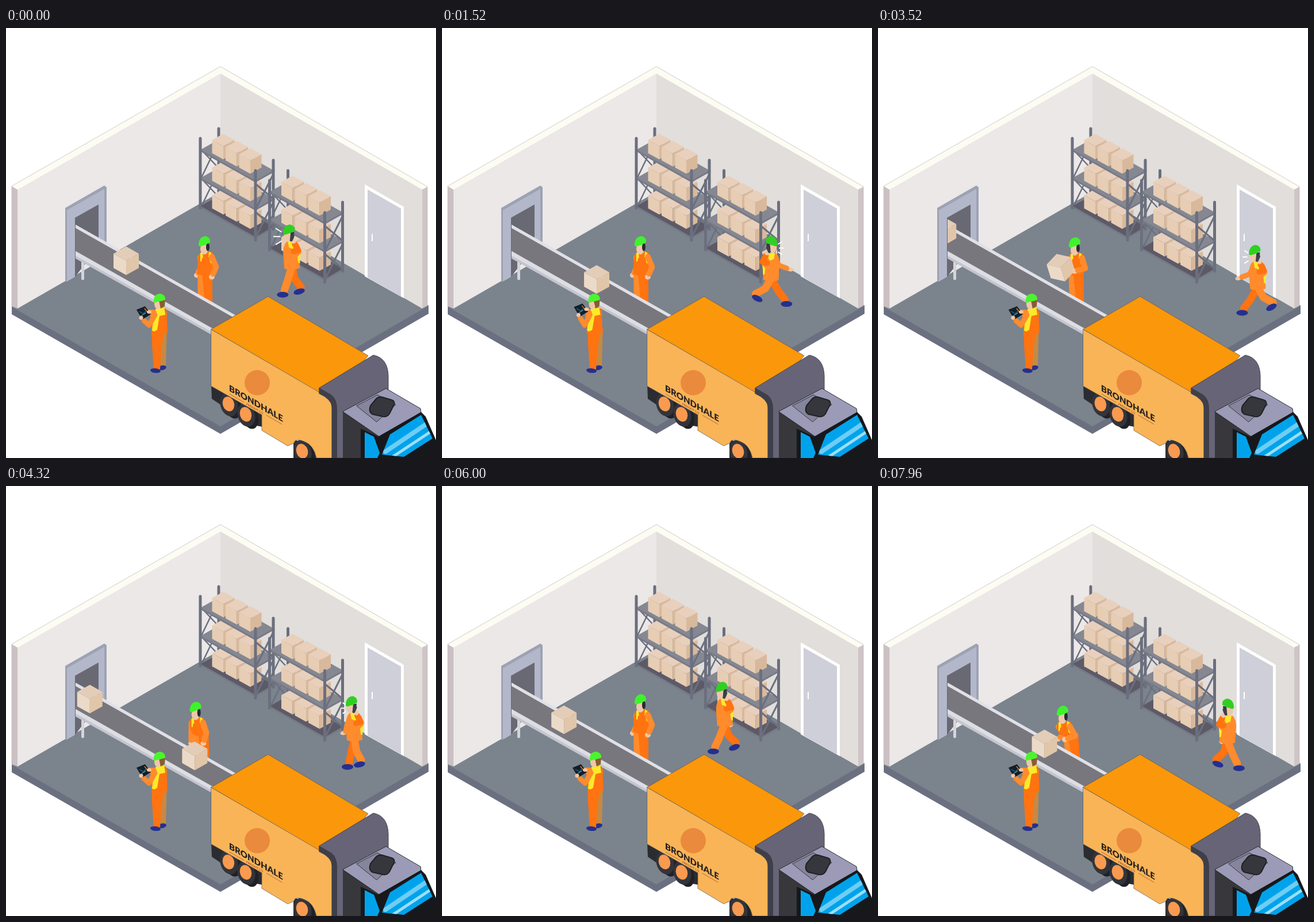
Write an HTML page with a canvas that moves like this. It is 748 px wide and 748 px high and loops after 8 s.

```html
<!DOCTYPE html>
<html lang="en">
<head>
<meta charset="utf-8">
<title>Warehouse</title>
<style>
html, body { margin: 0; width: 100%; height: 100%; overflow: hidden; background: #fff; }
canvas { display: block; width: 748px; height: 748px; }
</style>
</head>
<body>
<canvas id="stage" width="748" height="748"></canvas>
<script>
const ctx = document.getElementById('stage').getContext('2d');
const LOOP = 8000, CYCLE = 5920;
const ORANGE = '#ff7310', LIGHT = '#ff8b2c', SKIN = '#efc7a8', SHOE = '#24308f', YELLOW = '#fbe92b';
const STEEL = '#6b6f7e', SHELF = '#858791';

// ---- drawing helpers ----
function shape(color, d, edge, width = 1) {
  const path = new Path2D(d);
  ctx.fillStyle = color;
  ctx.fill(path);
  if (edge) { ctx.strokeStyle = edge; ctx.lineWidth = width; ctx.stroke(path); }
}
function line(color, width, ...points) {
  ctx.beginPath();
  for (let i = 0; i < points.length; i += 2) ctx.lineTo(points[i], points[i + 1]);
  ctx.strokeStyle = color;
  ctx.lineWidth = width;
  ctx.lineJoin = ctx.lineCap = 'round';
  ctx.stroke();
}
function oval(color, x, y, rx, ry = rx, turn = 0) {
  ctx.beginPath();
  ctx.ellipse(x, y, rx, ry, turn, 0, 7);
  ctx.fillStyle = color;
  ctx.fill();
}
function at(x, y, draw) {
  ctx.save();
  ctx.translate(x, y);
  draw();
  ctx.restore();
}
const mix = (a, b, k) => a + (b - a) * k;
const smooth = (a, b, t) => {
  const k = Math.min(1, Math.max(0, (t - a) / (b - a)));
  return k * k * (3 - 2 * k);
};
// Eased values between rows of [time, ...values].
function pose(keys, t) {
  const i = Math.max(1, keys.findIndex(k => k[0] >= t));
  const from = keys[i - 1], to = keys[i], k = smooth(from[0], to[0], t);
  return from.slice(1).map((v, n) => mix(v, to[n + 1], k));
}

// ---- room ----
function room() {
  shape('#6b7081', 'M10 484L373 692 735 482V497L373 706 10 498Z');
  shape('#7b838d', 'M10 485L373 284 735 483 373 693Z');
  shape('#ebe8e7', 'M20 281L373 79V285L20 488Z');
  shape('#e1dedb', 'M373 79L724 280V488L373 285Z');
  shape('#cbc0c3', 'M10 275L20 281V488L10 484Z');
  shape('#cfc5c7', 'M733 276L724 280V488L733 483Z');
  shape('#fdfcf3', 'M10 275L373 67 733 276 724 281 373 79 20 281Z');
  line('#b9b5b5', .7, 10, 485, 10, 275, 373, 67, 733, 276, 733, 483);

  shape('#fff', 'M624 272L692 311V470L624 432Z');
  shape('#cecfd8', 'M629 281L687 314V467L629 434Z');
  line('#fff', 2, 637, 359, 637, 370);

  shape('#9da2b3', 'M103 313L171 274 175 277V372L161 380V307L120 330V432L103 442Z');
  shape('#b2b7ca', 'M106 317L171 280V374L161 380V307L120 330V433L106 441Z');
  shape('#686973', 'M120 330L161 307V380L120 433Z');
}

function crate(x, y, w, h, depth, top, left, right) {
  at(x, y, () => {
    shape(top, `M0 0L${w} ${h} 0 ${2 * h} ${-w} ${h}Z`);
    shape(left, `M${-w} ${h}L0 ${2 * h}V${2 * h + depth}L${-w} ${h + depth}Z`);
    shape(right, `M${w} ${h}L0 ${2 * h}V${2 * h + depth}L${w} ${h + depth}Z`);
  });
}

function rack(x, y) {
  at(x, y, () => {
    line(STEEL, 5, 32, -15, 32, 103);
    for (const top of [22, 72]) {
      line(STEEL, 2.5, 2, top, 32, top + 32);
      line(STEEL, 2.5, 2, top + 48, 32, top - 14);
    }
    for (const level of [2, 1, 0]) {
      at(0, 49 * level, () => {
        shape(level === 2 ? '#5d5a68' : SHELF, 'M0 22L32 4 128 58 96 77Z');
        line('#777a86', 3, 0, 23, 96, 77, 128, 59);
        for (let i = 0; i < 3; i++) {
          crate(40 + 23.5 * i, -6 + 12.5 * i - level, 19.5, 10.8, 23, '#e8d0bd', '#e6cdb4', '#d9b99c');
        }
      });
    }
    for (const top of [82, 131]) {
      line(STEEL, 3, 97, top, 127, top + 25);
      line(STEEL, 3, 97, top + 42, 127, top - 18);
    }
    line(STEEL, 5, 0, 2, 0, 123);
    line(STEEL, 5, 96, 58, 96, 179);
    line(STEEL, 5, 127, 40, 127, 160);
  });
}

function conveyor() {
  line('#d3d4dc', 5, 133.5, 400, 133.5, 436);
  shape('#77777d', 'M121 346L400 504 400 545 121 392Z');
  shape('#c4c5ce', 'M121 394L360 528V535L121 401Z');
  shape('#dddde4', 'M121 388L360 523V530L121 396Z');
  shape('#e0e0e6', 'M121 342L400 500V506L121 348Z');
}

// ---- parcels ----
const beltY = x => 405 + .542 * (x - 209);
const SPEED = .0395;
function parcelAt(t) {
  if (t > 2080 && t < 4160) {
    return pose([[2080, 291, 449, 0], [2520, 301, 379, 0], [3440, 318, 417, -.3],
      [3600, 318, 417, -.3], [4160, 322, 466, 0]], t);
  }
  const x = t < 3000 ? 209 + SPEED * t : 322 + SPEED * (t - 4160);
  return [x, beltY(x), 0];
}
function parcel(t) {
  if (t < -2700 || t > 5880) return;
  const [x, y, turn] = parcelAt(t);
  const blur = Math.max(0, 1.5 - Math.abs(t - 2520) / 130);
  ctx.save();
  ctx.beginPath();
  ctx.rect(121, 0, 627, 748);
  ctx.clip();
  ctx.globalAlpha = 1 - smooth(5560, 5880, t);
  ctx.translate(x, y);
  ctx.rotate(turn);
  if (blur) ctx.filter = `blur(${blur}px)`;
  crate(0, -25, 22, 12.4, 25, '#e4cdb8', '#ebdac7', '#e1c6aa');
  ctx.restore();
}

// ---- people ----
function helmet(x, y, color) {
  shape(color, `M${x - 10} ${y + 5}Q${x - 9} ${y - 8} ${x + 2} ${y - 9}Q${x + 11} ${y - 7} ${x + 10} ${y + 2}
    Q${x + 2} ${y + 7} ${x - 7} ${y + 9}Q${x - 11} ${y + 8} ${x - 10} ${y + 5}Z`);
}
// The elbow bends out as the hand comes closer than the arm's reach.
function arm(x, y, hx, hy, reach, color, side = 1) {
  const dx = hx - x, dy = hy - y, d = Math.hypot(dx, dy);
  const bend = side * Math.sqrt(Math.max(0, reach * reach - d * d)) / 2 / d;
  const ex = x + dx / 2 + dy * bend, ey = y + dy / 2 - dx * bend;
  oval(SKIN, hx, hy, 5, 4.5);
  line(color, 10, x, y, ex, ey, mix(ex, hx, .68), mix(ey, hy, .68));
}

const LOADER = [
  // time, head, left hand, right hand
  [0, 345, 371, 332, 430, 358, 433], [1560, 345, 371, 332, 430, 358, 433],
  [2040, 321, 391, 313, 440, 325, 441], [2520, 343, 372, 312, 402, 324, 399],
  [3440, 342, 373, 333, 423, 342, 423], [3600, 342, 373, 333, 423, 342, 423],
  [4160, 323, 390, 318, 455, 337, 454], [4600, 345, 371, 332, 430, 358, 433],
  [CYCLE, 345, 371, 332, 430, 358, 433]
];
function loaderBody([x, y, lx, ly]) {
  const hx = 346 + (x - 345) * .45, hy = 428 + (y - 371) * .35;
  const foot = 347 + (x - 345) * .3;
  arm(x - 7, y + 28, lx, ly, 33, LIGHT);
  shape(LIGHT, `M${hx - 13} ${hy - 4}L${hx + 2} ${hy}L${foot} 480H${foot - 13}Z`);
  shape(ORANGE, `M${hx - 5} ${hy - 2}L${hx + 13} ${hy - 6}L${foot + 12} 482H${foot - 1}Z`);
  shape(ORANGE, `M${x - 9} ${y + 21}Q${x} ${y + 17} ${x + 14} ${y + 19}Q${x + 18} ${y + 30} ${hx + 13} ${hy}
    Q${hx} ${hy + 5} ${hx - 13} ${hy}Q${x - 13} ${y + 38} ${x - 9} ${y + 21}Z`);
  shape(YELLOW, `M${x - 7} ${y + 20}L${x - 3} ${y + 19}L${x - 2} ${y + 32}H${x + 7}L${x + 8} ${y + 18}
    L${x + 12} ${y + 20}L${x + 14} ${y + 40}L${x + 10} ${y + 37}L${x - 7} ${y + 35}Z`);
  shape(ORANGE, `M${x - 4} ${y + 29}L${x + 9} ${y + 28}L${x + 11} ${y + 42}H${x - 6}Z`);
  oval(SKIN, x, y + 13, 7, 10);
  oval('#282a35', x + 6, y + 10, 3, 7);
  helmet(x, y, '#3ef32c');
}
const loaderArm = ([x, y, , , rx, ry]) => arm(x + 13, y + 27, rx, ry, 38, LIGHT);

function checker(t) {
  const up = smooth(420, 940, t) - smooth(1420, 1780, t);
  at(0, 0, () => {
    shape('#c48a45', 'M267 524L280 521 278 588 269 589Z');
    oval(SHOE, 272, 591, 7, 4, -.2);
    shape(ORANGE, 'M253 520L276 520 270 560 268 594H257L254 550Z');
    oval(SHOE, 260, 596, 9, 4, .1);
    ctx.translate(-2 * up, 0);
    shape(ORANGE, 'M257 493Q265 486 279 490L281 530Q267 539 253 530L255 510Z');
    shape(YELLOW, 'M260 489Q270 484 278 488L280 498 267 501 263 525Q257 530 254 526L256 508Z');
    line(ORANGE, 3, 277, 489, 279, 500);
    oval(SKIN, 264 - up, 480, 6, 9);
    shape('#8b5b35', `M${266 - up} 474L${277 - up} 473 ${276 - up} 484 269 488Z`);
    shape('#4af52f', `M${257 - up} 474Q${257 - up} 463 ${268 - up} 462Q${278 - up} 464 ${277 - up} 473
      L${266 - up} 476 ${257 - up} 478Z`);
    arm(256, 502, 250 + 2 * up, 495 - 5 * up, 14, LIGHT, -1);
    line(LIGHT, 9, 259, 499, 249 + up, 517, 240 + 3 * up, 509 - 5 * up);
  });
  at(3 * up, -6 * up, () => {
    shape('#101f2b', 'M227 490L242 484 252 498 237 507Z');
    line('#2b708a', 1.2, 232, 493, 239, 497, 243, 493);
    line('#79bfd0', 1, 236, 500, 243, 496);
    line('#e98b3a', 1.2, 241, 488, 246, 494);
    oval(SKIN, 235, 504, 3.5);
    oval(SKIN, 249, 494, 4, 3);
  });
}

function walkingLeg(offset, color) {
  const behind = Math.max(0, -offset);
  const fx = offset, fy = 63 + Math.sqrt(53 * 53 - offset * offset) - behind * .3;
  line(color, 13, 0, 64, fx / 2 + 1 + behind * .1, (64 + fy) / 2, fx, fy - 9);
  oval(SHOE, fx + 3, fy - 1, 10, 5, behind * .018);
}
function soundWaves(beat) {
  if (beat < .06) return;
  const inner = 11 + 5 * beat, outer = 12.5 + 15 * beat;
  for (const a of [-.55, 0, .55]) {
    const c = Math.cos(a), s = Math.sin(a);
    line('#fff', 2, inner * c, 12 + inner * s, outer * c, 12 + outer * s);
  }
}
function walker(t) {
  const turnLeft = 3115, turnRight = 160;
  const time = t < turnRight ? t + CYCLE : t;
  const right = time < turnLeft;
  const p = time - (right ? turnRight : turnLeft);
  const x = right ? 480 + .0686 * p : 683 - .068 * p;
  const y = 371 + .218 * (x - 574) - (right ? 0 : 2.5);
  const stride = Math.cos((p - (right ? 1360 : 405)) * Math.PI / 500);
  const half = 22 * stride + 5;
  at(x, y, () => {
    if (!right) ctx.scale(-1, 1);
    at(right ? -1 : -5, 0, () => {
      const hx = 10 + 21 * stride, hy = 58 - 9 * stride;
      oval(SKIN, hx + 2, hy, 6, 3.5, .2);
      line(LIGHT, 9, 7, 29, 12 + 2 * stride, 42, mix(7, hx, .85), mix(29, hy, .9));
      walkingLeg(half - 3, ORANGE);
      walkingLeg(-half, LIGHT);
      shape(LIGHT, 'M-12 25Q-2 18 9 21Q15 27 15 40L13 68Q0 72-14 67L-13 48-17 38Z');
      shape(YELLOW, 'M-9 22L7 20 5 31-2 34Z');
      shape(YELLOW, 'M-15 42L-10 47-11 57-14 59Z');
    });
    oval(SKIN, 1, 11, 8, 10);
    shape('#353943', 'M-9 4L-3 5-2 15-5 21-8 16Z');
    line(ORANGE, 10, -8, 38, -16, 36, -10, 25);
    oval(SKIN, -8, 20, 4.5);
    line('#3c414a', 5, -7, 11, -4, 18);
    soundWaves(time % 1000 / 1000);
    ctx.scale(-1, 1);
    helmet(0, 0, '#2fd021');
  });
}

// ---- truck ----
function wheel(x, y) {
  oval('#202126', x + 6, y + 2, 14, 23, -.3);
  oval('#33343a', x, y, 15, 21, -.3);
  oval('#f99a50', x - 1, y - 1, 10, 13, -.3);
}
function cab() {
  shape('#37373c', 'M586 667L650 706V748H586Z');
  shape('#9b9bb7', 'M586 667L661 627 721 662 722 669 650 711Z', '#2b2b30');
  shape('#85859e', 'M610 657L646 638 678 655 645 685Z', '#303036');
  shape('#36373d', `M634 657L644 645Q648 641 654 642L671 647Q677 649 675 655L667 671Q663 677 656 676L638 672
    Q630 668 634 657Z`, '#202126', 2);
  shape('#17181b', 'M647 711L722 668 730 676 748 717V748H617V697L624 698Z');
  shape('#37373c', 'M586 668L648 711 617 697V748H586Z');
  shape('#00a3eb', 'M624 703L640 711 650 739 646 748H624Z');
  const windscreen = 'M668 707L722 673 742 714 692 746 654 742Z';
  shape('#00a3eb', windscreen);
  ctx.save();
  ctx.clip(new Path2D(windscreen));
  line('#6fcdf5', 8, 660, 737, 734, 687);
  line('#9ddff9', 5, 674, 745, 742, 700);
  ctx.restore();
}
function truck() {
  shape('#2b2c31', 'M357 620L448 670V694L425 690 358 645Z');
  wheel(388, 655);
  wheel(418, 673);
  shape('#2b2c31', 'M500 715L545 735V748H500Z');
  wheel(516, 737);
  shape('#f9b457', 'M357 524L567 645V748H540Q535 725 518 719 503 713 501 722L490 727 445 700V673L357 623Z', '#55585d', .7);
  shape('#fb970b', 'M357 524L456 467 630 570 567 646Z', '#555', .7);

  oval('#ea8a3c', 437, 617, 22);
  at(388, 631, () => {
    ctx.transform(1, .58, 0, 1, 0, 0);
    ctx.fillStyle = '#292321';
    ctx.font = '900 15px Lato, sans-serif';
    ctx.fillText('BRONDHALE', 0, 0);
    ctx.fillStyle = '#a4512d';
    ctx.font = 'bold 5px Lato, sans-serif';
    ctx.fillText('FREIGHT CO', 30, 7);
    line('#a4512d', .8, 1, 5, 26, 5);
    line('#a4512d', .8, 65, 5, 92, 5);
  });

  shape('#666476', 'M545 626L639 569Q664 574 665 605V629L587 668V748H567V660Q567 646 545 636Z', '#45454d');
  shape('#3f3f4a', 'M545 626L566 638Q576 646 576 662V748H567V660Q567 646 545 636Z');
  cab();
}

function render(t) {
  const phase = t % CYCLE;
  const loader = pose(LOADER, phase);
  ctx.fillStyle = '#fff';
  ctx.fillRect(0, 0, 748, 748);
  room();
  rack(338, 190);
  rack(458.5, 263);
  walker(phase);
  loaderBody(loader);
  conveyor();
  for (const shift of [-CYCLE, 0]) parcel(phase + shift);
  loaderArm(loader);
  checker(phase);
  truck();
}

const start = performance.now();
function frame() {
  render((performance.now() - start) % LOOP);
  requestAnimationFrame(frame);
}
frame();
</script>
</body>
</html>
```
